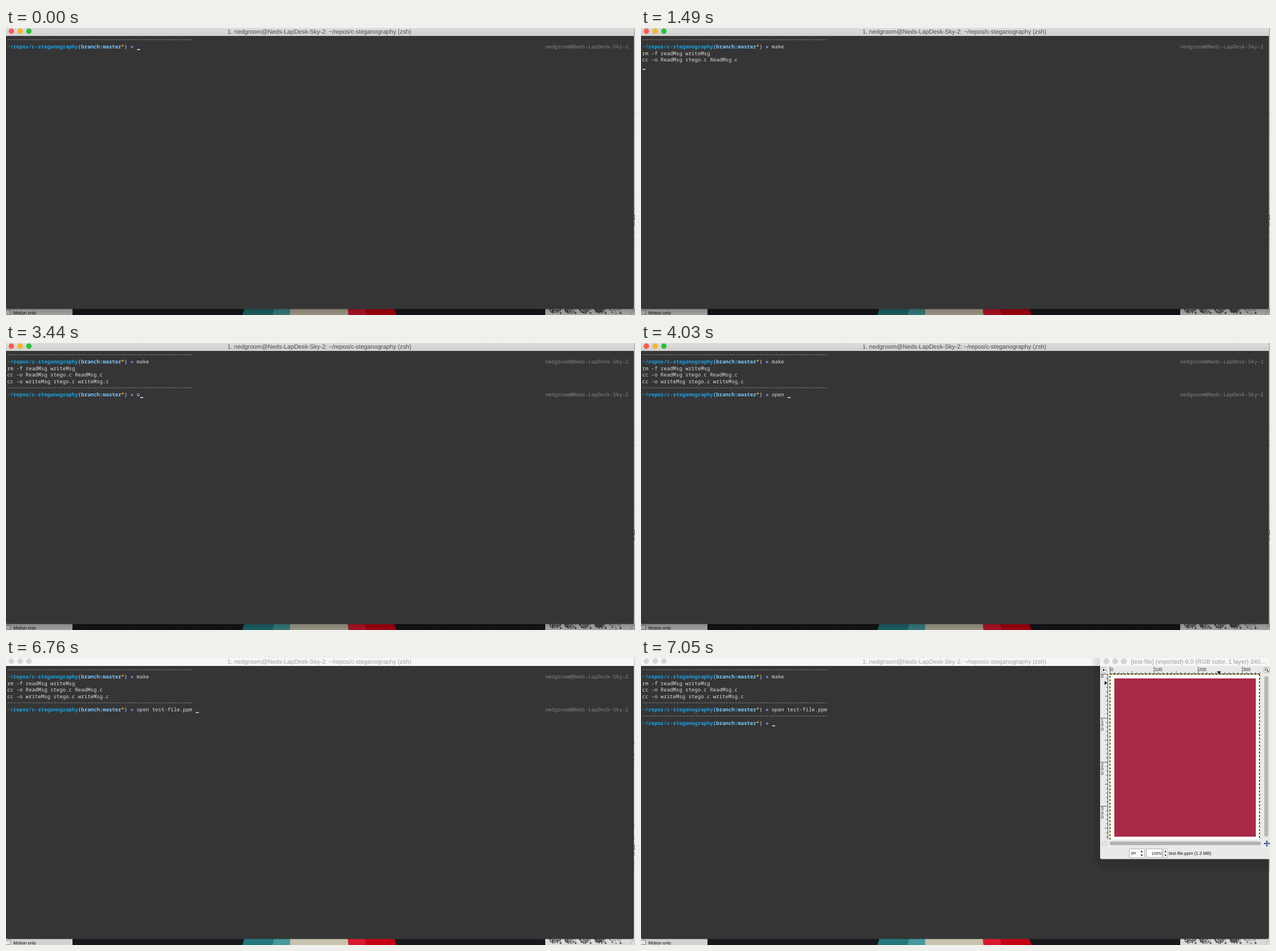
Animation of 1107x506 px, one loop 8000 ms. Source, as an HTML page:

```html
<!DOCTYPE html>
<html lang="en">
<head>
<meta charset="utf-8">
<title>Terminal session</title>
<style>
  html, body { margin: 0; width: 100%; height: 100%; overflow: hidden; background: #121417; }
  svg { display: block; width: 1107px; height: 506px; }
  text { white-space: pre; text-rendering: geometricPrecision; font-family: "Liberation Sans", Arial, sans-serif; }
  .term text { font: 500 9.06px "Noto Sans Mono", "DejaVu Sans Mono", monospace; fill: #dadada; }
  .term .host { fill: #848484; }
  .term tspan[class] { font-weight: 600; }
  .path { fill: #18a2e2; }
  .branch { fill: #7cc8fc; }
  .term .dirty { fill: #ffaf00; font-weight: 800; }
  .arrow { fill: #8c9cff; }
  .title { font-size: 10.7px; }
  .small { font-size: 7.8px; fill: #111; }
  .zoom { font-size: 7.2px; fill: #111; }
  .ruler { font-size: 8px; fill: #222; }
</style>
</head>
<body>
<svg viewBox="0 0 1107 506" xmlns="http://www.w3.org/2000/svg">
  <defs>
    <linearGradient id="bar" x2="0" y2="1"><stop stop-color="#dcdcdc"/><stop offset="1" stop-color="#d0d0d0"/></linearGradient>
    <linearGradient id="shade" x2="0" y2="1"><stop stop-opacity=".36"/><stop offset="1" stop-opacity=".24"/></linearGradient>
    <filter id="soft" x="-20%" y="-20%" width="140%" height="140%"><feGaussianBlur stdDeviation="3"/></filter>
    <clipPath id="brushClip"><rect x="949" y="495" width="155" height="11"/></clipPath>
  </defs>

  <!-- desktop behind the terminal -->
  <rect width="1107" height="506" fill="#17191c"/>
  <path d="M0 490H117V506H0Z" fill="#d2d2d2"/>
  <path d="M0 497.5H8V505.5H0" fill="#e2e2e2" stroke="#777" stroke-width=".8"/>
  <text class="small" x="13" y="504.5">Motion only</text>
  <path d="M421 490H474L469 506H416Z" fill="#24787c"/>
  <path d="M473 490H501V506H469Z" fill="#459a9d"/>
  <path d="M500 490H601L603 506H500Z" fill="#c8c2ac"/>
  <path d="M601 490H631L635 506H603Z" fill="#d9182f"/>
  <path d="M631 490H682L687 506H635Z" fill="#c90012"/>
  <path d="M949 490H1107V506H949Z" fill="#dadada"/>
  <g id="brushes" clip-path="url(#brushClip)"></g>
  <path d="M1098 506L1104 496" stroke="#aaa" fill="none"/>
  <rect x="1104" width="3" height="506" fill="#d8d8d8"/>
  <path d="M1104 150.5H1107M1104 171H1107M1104 180H1107M1104 294H1107M1104 319H1107M1104 360H1107M1104 374H1107" stroke="#8b8b8b"/>
  <path d="M1104 330H1106.5V338H1104M1105 343.5H1107M1105 347H1107" stroke="#555" fill="none"/>
  <g id="dim">
    <rect y="494" width="1107" height="12" fill="url(#shade)"/>
    <rect x="1104" width="3" height="494" fill-opacity=".14"/>
  </g>

  <!-- terminal -->
  <path d="M0 0H1105V492.5Q1105 495.5 1102 495.5H3Q0 495.5 0 492.5Z" fill="#353536"/>
  <rect id="titleBar" width="1105" height="14"/>
  <g id="lights"></g>
  <text id="title" class="title" x="551.5" y="9.7" text-anchor="middle">1. nedgroom@Neds-LapDesk-Sky-2: ~/repos/c-steganography (zsh)</text>
  <g class="term" id="term"></g>
  <rect id="cursor" width="5.4" height="1.5" fill="#e4e4e4"/>

  <!-- image viewer -->
  <g id="viewer">
    <rect x="797" y="-20" width="330" height="393" rx="20" fill-opacity=".1" filter="url(#soft)"/>
    <path d="M808 0H1107V354.5H811Q808 354.5 808 351.5Z" fill="#e9e9e9"/>
    <rect x="808" width="299" height="14" fill="#f6f6f6"/>
    <g id="viewerLights"></g>
    <text class="title" x="862" y="9.7" fill="#9c9c9c">[test-file] (imported)-9.0 (RGB color, 1 layer) 340…</text>
    <rect x="810.5" y="16.5" width="8" height="9" rx="1" fill="#f4f4f4" stroke="#999" stroke-width=".8"/>
    <path d="M813 18.5L817 21L813 23.5Z" fill="#333"/>
    <rect x="825" y="28" width="264" height="292" fill="#fff"/>
    <rect x="833" y="36" width="249" height="279" fill="#a92a48"/>
    <g fill="none" stroke-width="1.4">
      <path d="M825.5 320V28.5H1088.5V320" stroke="#f8f050"/>
      <path d="M825.5 320V28.5H1088.5" stroke="#111" stroke-dasharray="3.1"/>
      <path d="M1088.5 28.5V320" stroke="#111" stroke-dasharray="3.1" stroke-dashoffset="5.8"/>
    </g>
    <g id="rulers"></g>
    <path d="M1013.5 23.5H1020.5L1017 28ZM816 40.5V47.5L820.5 44Z" fill="#111"/>
    <rect x="1097" y="32" width="7" height="283" rx="3.5" fill="#b7b7b7"/>
    <rect x="825" y="323.5" width="266" height="6.5" rx="3.2" fill="#b3b3b3"/>
    <rect x="1096.5" y="16.5" width="9" height="9" rx="1" fill="#f4f4f4" stroke="#999" stroke-width=".8"/>
    <path d="M1102 22L1104.5 24.5" stroke="#333" stroke-width="1.3"/>
    <circle cx="1100.5" cy="20.5" r="2" fill="#fff" stroke="#333"/>
    <rect x="811.5" y="323.5" width="7" height="7" fill="none" stroke="#888" stroke-dasharray="1.2 2.3"/>
    <path d="M1097 327H1106M1101.5 322.5V331.5" stroke="#27417f" stroke-width="1.4"/>
    <path d="M1096 327L1098.5 325V329ZM1107 327L1104.5 325V329ZM1101.5 321.5L1099.5 324H1103.5ZM1101.5 332.5L1099.5 330H1103.5Z" fill="#27417f"/>
    <g fill="#fff" stroke="#9c9c9c" stroke-width=".8">
      <rect x="859.5" y="336.5" width="27" height="15.5" rx="2"/>
      <rect x="889.5" y="336.5" width="27.5" height="15"/>
      <rect x="919" y="336.5" width="8" height="15.5" rx="3"/>
    </g>
    <path d="M879 342.5L881.2 339L883.4 342.5ZM879 346.5L881.2 350L883.4 346.5ZM920.8 342.5L923 339L925.2 342.5ZM920.8 346.5L923 350L925.2 346.5Z" fill="#444"/>
    <text class="small" x="863" y="346">px</text>
    <text class="zoom" x="917" y="347" text-anchor="end">100%</text>
    <text class="small" x="929" y="347">test-file.ppm (1.3 MB)</text>
  </g>
</svg>
<script>
const LOOP = 8000, BLUR = 6760, OPENED = 6910;
const CELL = 5.436, LINE = 11.66, LEFT = 2, PROMPT = 42;
const $ = id => document.getElementById(id);
const baseline = row => 24.4 + row * LINE;

function add(parent, tag, attrs, text) {
  const el = document.createElementNS('http://www.w3.org/2000/svg', tag);
  for (const key in attrs) el.setAttribute(key, attrs[key]);
  if (text) el.textContent = text;
  return parent.appendChild(el);
}

// Cursor stops: time, row, column
const stops = [
  [0, 1, 42], [450, 1, 43], [600, 1, 45], [750, 1, 46],
  [1490, 4, 0], [1640, 6, 42],
  [3440, 6, 43], [3590, 6, 44], [3730, 6, 45], [3880, 6, 46], [4030, 6, 47],
  [4480, 6, 49], [4920, 6, 61], [OPENED, 8, 42]
];

const timed = [];
const prompts = [];

function addLine(from, row, text) {
  const el = add($('term'), 'text', { x: LEFT, y: baseline(row) }, text);
  timed.push({ el, from });
}

function addPrompt(from, row, command) {
  const group = add($('term'), 'g', {});
  const y = baseline(row), ruleY = y - LINE - 3.7;
  add(group, 'line', {
    x1: LEFT + .6, x2: LEFT + 60 * CELL, y1: ruleY, y2: ruleY,
    stroke: '#7d7d7d', 'stroke-width': 1, 'stroke-dasharray': `4 ${CELL - 4}`
  });
  const line = add(group, 'text', { x: LEFT, y });
  const part = (name, text) => add(line, 'tspan', { class: name }, text);
  part('path', '~/repos/c-steganography');
  part('branch', '(branch:master');
  part('dirty', '*');
  part('branch', ')');
  part('arrow', ' » ');
  const input = add(line, 'tspan', {});
  add(group, 'text', { class: 'host', x: 1095.5, y, 'text-anchor': 'end' }, 'nedgroom@Neds-LapDesk-Sky-2');
  timed.push({ el: group, from });
  prompts.push({ row, command, input });
}

addPrompt(0, 1, 'make');
addLine(1490, 2, 'rm -f readMsg writeMsg');
addLine(1490, 3, 'cc -o ReadMsg stego.c ReadMsg.c');
addLine(1640, 4, 'cc -o writeMsg stego.c writeMsg.c');
addPrompt(1640, 6, 'open test-file.ppm ');
addPrompt(OPENED, 8, '');
timed.push({ el: $('viewer'), from: OPENED });

const lightColors = ['#fc5a52', '#f7b42c', '#28c13a'];
const lights = [9.5, 25, 40.3].map(cx => add($('lights'), 'circle', { cx, cy: 5.6, r: 4.8 }));
[819, 834.5, 849.7].forEach(cx =>
  add($('viewerLights'), 'circle', { cx, cy: 6, r: 4.7, fill: '#d5d5d5', stroke: '#c4c4c4', 'stroke-width': .6 }));

function drawRulers() {
  const step = 7.76;
  let ticks = 'M821.5 28V320M825 28H1089';
  const size = i => i % 10 === 0 ? 13 : i % 5 === 0 ? 5 : 3;
  for (let i = 0; i <= 34; i++) ticks += `M${825.5 + i * step} 28v${-size(i)}`;
  for (let i = 0; i <= 37; i++) ticks += `M821.5 ${28.5 + i * step}h${-size(i)}`;
  add($('rulers'), 'path', { d: ticks, stroke: '#333', 'stroke-width': .8, fill: 'none' });
  for (let n = 0; n < 4; n++) {
    const label = String(n * 100), offset = n * 10 * step;
    add($('rulers'), 'text', { class: 'ruler', x: 826.5 + offset, y: 22.5 }, label);
    [...label].forEach((digit, i) =>
      add($('rulers'), 'text', { class: 'ruler', x: 809.5, y: 35.3 + offset + i * 7.5 }, digit));
  }
}

function drawBrushes() {
  let seed = 7;
  const random = () => (seed = seed * 16807 % 2147483647) / 2147483647;
  add($('brushes'), 'circle', { cx: 1044, cy: 493, r: 8, fill: '#777' });
  let dots = '';
  for (let clump = 0; clump < 5; clump++) {
    const count = clump === 4 ? 35 : 120;
    for (let i = 0; i < count; i++) {
      const angle = random() * Math.PI, radius = 11 * Math.sqrt(random());
      const x = 966 + clump * 26.3 + radius * Math.cos(angle);
      const y = 493 + radius * Math.sin(angle);
      dots += `M${x.toFixed(1)} ${y.toFixed(1)}h1`;
    }
    dots += `M${974 + clump * 26.4} 502.5h4m-2 -2v4`;
  }
  add($('brushes'), 'path', { d: dots, stroke: '#1a1a1a', 'stroke-width': .9, fill: 'none' });
}

function render(t) {
  const focused = t < BLUR;
  const [, row, col] = stops.filter(stop => stop[0] <= t).pop();
  for (const { el, from } of timed) el.style.display = t >= from ? '' : 'none';
  for (const p of prompts) p.input.textContent = p.row === row ? p.command.slice(0, col - PROMPT) : p.command;
  $('cursor').setAttribute('x', LEFT + .4 + col * CELL);
  $('cursor').setAttribute('y', baseline(row) + 1.1);
  $('dim').style.display = focused ? '' : 'none';
  $('titleBar').setAttribute('fill', focused ? 'url(#bar)' : '#f6f6f6');
  $('title').setAttribute('fill', focused ? '#4a4a4a' : '#a2a2a2');
  lights.forEach((light, i) => light.setAttribute('fill', focused ? lightColors[i] : '#d5d5d5'));
}

drawRulers();
drawBrushes();
const start = performance.now();
function frame() {
  render(Math.max(0, performance.now() - start) % LOOP);
  requestAnimationFrame(frame);
}
frame();
</script>
</body>
</html>
```
